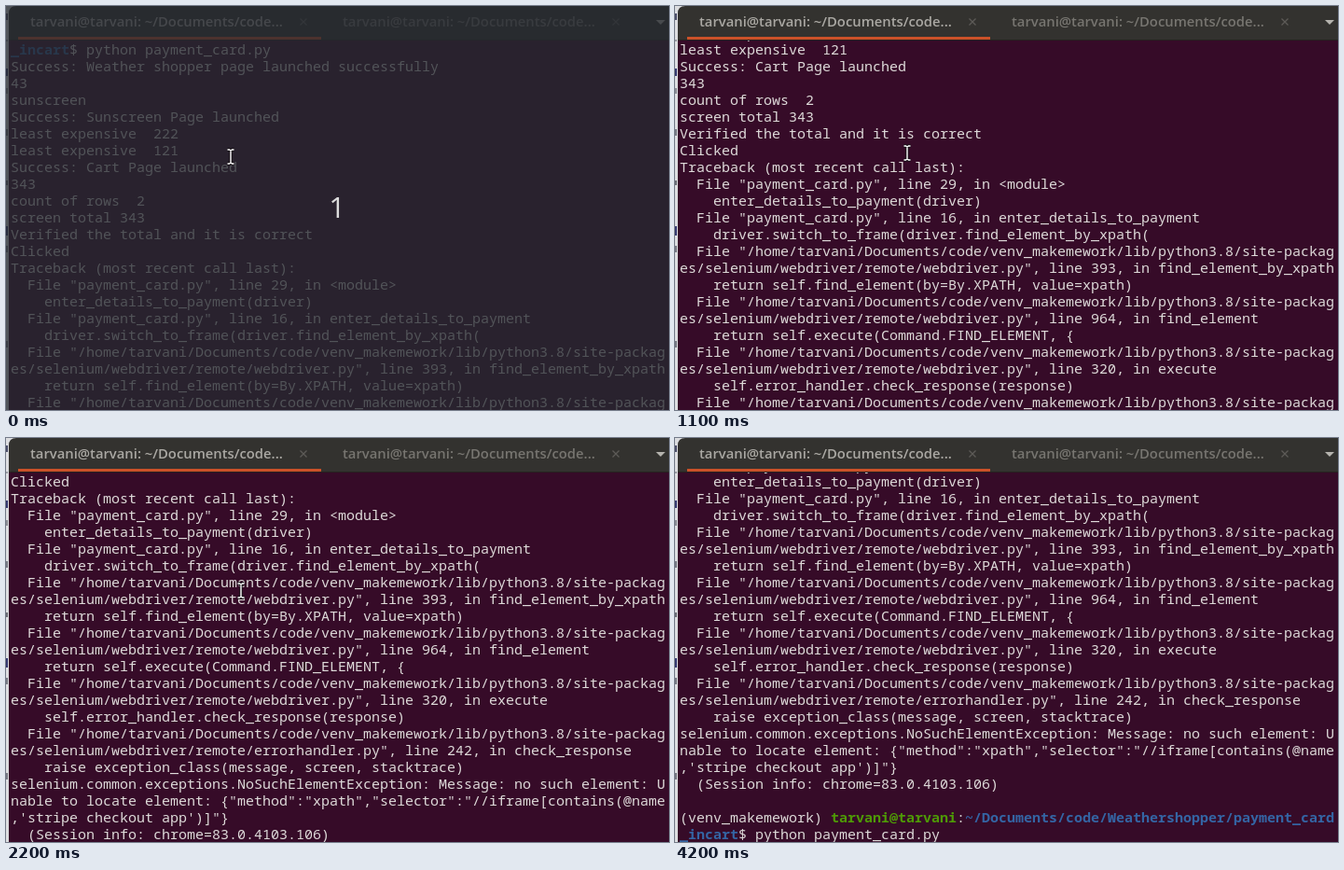
These frames come from a looping animation (711x433 px, 5300 ms). An HTML page:

```html
<!DOCTYPE html>
<html lang="en">
<head>
<meta charset="utf-8">
<title>Terminal session</title>
<style>
  html, body { margin: 0; width: 100%; height: 100%; overflow: hidden; background: #dcdde0; }
  svg { display: block; width: 711px; height: 433px; }
  text { white-space: pre; }
  .term { font: 15px "Noto Sans Mono", "DejaVu Sans Mono", monospace; fill: #dedad9; }
  .path { fill: #3465a4; font-weight: 700; }
  .host { fill: #4e9a06; font-weight: 700; }
  .tab { font: 600 14.8px "Open Sans", "Noto Sans", sans-serif; }
  .count { font: 31px "Open Sans", "Noto Sans", sans-serif; fill: #dcdcdc; text-anchor: middle; }
</style>
</head>
<body>
<svg viewBox="0 0 711 433">
  <defs><clipPath id="view"><rect x="3" y="37" width="708" height="396"/></clipPath></defs>
  <rect width="711" height="433" fill="#dcdde0"/>
  <g id="behind"></g>
  <rect x="3" y="30" width="708" height="403" fill="#360b28"/>
  <path d="M3 37V8Q3 0 11 0H711V37Z" fill="#33322f"/>
  <rect x="3" y="36" width="708" height="1" fill="#25231f"/>
  <rect x="13" y="33" width="325" height="3" fill="#cb5129"/>
  <g id="tabs"></g>
  <path d="M697 15H707L702 20Z" fill="#b5b3ae"/>
  <g clip-path="url(#view)"><g id="lines" class="term"></g></g>
  <g id="countdown">
    <rect width="711" height="433" fill="#252a30" opacity=".76"/>
    <text class="count" x="355" y="227">1</text>
  </g>
  <g id="pointer">
    <g id="beam" fill="none">
      <path d="M-3.5-7.5H-1.5L0-6.5L1.5-7.5H3.5M0-6.5V6.5M-3.5 7.5H-1.5L0 6.5L1.5 7.5H3.5" stroke="#161016" stroke-width="3.4"/>
      <path d="M-3.5-7.5H-1.5L0-6.5L1.5-7.5H3.5M0-6.5V6.5M-3.5 7.5H-1.5L0 6.5L1.5 7.5H3.5" stroke="#fff" stroke-width="1.4"/>
    </g>
    <path id="arrow" d="M0 0V14L3.3 11L5.6 16L7.8 15L5.6 10.2H10Z" fill="#161616" stroke="#fff"/>
  </g>
</svg>
<script>
const LOOP = 5300, ROW = 18;
const $ = id => document.getElementById(id);

function add(parent, tag, attrs, text = "") {
  const el = document.createElementNS("http://www.w3.org/2000/svg", tag);
  for (const key in attrs) el.setAttribute(key, attrs[key]);
  el.textContent = text;
  return parent.appendChild(el);
}

const user = "tarvani";
const home = `/home/${user}/Documents/code/`;
const prompt = [["_incart", "path"], ["$ python payment_card.py", ""]];
const fileLine = `  File "${home}venv_makemework/lib/python3.8/site-packag`;
const trace = (file, line, fn, code) =>
  [fileLine, `es/selenium/webdriver/remote/${file}.py", line ${line}, in ${fn}`, "    " + code];

const lines = [
  prompt,
  "Success: Weather shopper page launched successfully",
  "43",
  "sunscreen",
  "Success: Sunscreen Page launched",
  "least expensive  222",
  "least expensive  121",
  "Success: Cart Page launched",
  "343",
  "count of rows  2",
  "screen total 343",
  "Verified the total and it is correct",
  "Clicked",
  "Traceback (most recent call last):",
  '  File "payment_card.py", line 29, in <module>',
  "    enter_details_to_payment(driver)",
  '  File "payment_card.py", line 16, in enter_details_to_payment',
  "    driver.switch_to_frame(driver.find_element_by_xpath(",
  ...trace("webdriver", 393, "find_element_by_xpath", "return self.find_element(by=By.XPATH, value=xpath)"),
  ...trace("webdriver", 964, "find_element", "return self.execute(Command.FIND_ELEMENT, {"),
  ...trace("webdriver", 320, "execute", "self.error_handler.check_response(response)"),
  ...trace("errorhandler", 242, "check_response", "raise exception_class(message, screen, stacktrace)"),
  "selenium.common.exceptions.NoSuchElementException: Message: no such element: U",
  'nable to locate element: {"method":"xpath","selector":"//iframe[contains(@name',
  ",'stripe checkout app')]\"}",
  "  (Session info: chrome=83.0.4103.106)",
  "",
  [["(venv_makemework) ", ""], [`${user}@${user}`, "host"], [":", ""],
   ["~/Documents/code/Weathershopper/payment_card", "path"]],
  prompt
];

lines.forEach((line, i) => {
  const row = add($("lines"), "text", { x: 5, y: 52 + i * ROW });
  const spans = Array.isArray(line) ? line : [[line, ""]];
  for (const [text, cls] of spans) add(row, "tspan", { class: cls }, text);
});

for (const [x, color] of [[26, "#aaa8a3"], [361, "#777570"]]) {
  add($("tabs"), "text", { class: "tab", x, y: 22, fill: color }, `${user}@${user}: ~/Documents/code...`);
  add($("tabs"), "path", { d: `M${x + 289.5} 13.5l7 7m0-7l-7 7`, stroke: "#5d5b57", "stroke-width": 1.3 });
}

// Slivers of the window behind the terminal: y, height, colour
for (const [y, h, color] of [[8, 7, "#4a4d68"], [36, 2, "#999ba3"], [67, 8, "#34386e"], [88, 6, "#8a8b94"],
  [132, 7, "#777983"], [187, 5, "#6a6c75"], [236, 10, "#34386e"], [257, 7, "#777983"], [359, 7, "#777983"]])
  add($("behind"), "rect", { x: 0, y, width: 2, height: h, fill: color });

// Time, first visible line
const scroll = [[0, 0], [800, 3], [1100, 6], [1400, 9], [1700, 12], [2600, 15]];
// Time, x, y, shape
const pointer = [
  [0, 241, 161.5, "beam"], [100, 241, 160, "beam"],
  [300, 242, 161, "beam"], [400, 244, 160, "beam"], [500, 247, 158, "beam"], [600, 249, 157.5, "beam"],
  [2200, 252, 163.5, "beam"],
  [3700, 196, 112, "beam"], [3800, 151, 75, "beam"],
  [4000, 116, 45, "beam"], [4100, 73, 7, "arrow"], [4200, 0, 0, "none"]
];
const at = (keys, t) => keys.filter(key => key[0] <= t).pop();
const show = (id, on) => $(id).setAttribute("visibility", on ? "visible" : "hidden");

function draw(t) {
  $("lines").setAttribute("transform", `translate(0 ${-at(scroll, t)[1] * ROW})`);
  show("countdown", t < 100);
  const [, x, y, shape] = at(pointer, t);
  $("pointer").setAttribute("transform", `translate(${x} ${y})`);
  show("beam", shape === "beam");
  show("arrow", shape === "arrow");
}

const start = performance.now();
function tick() {
  draw((performance.now() - start) % LOOP);
  requestAnimationFrame(tick);
}
tick();
</script>
</body>
</html>
```
